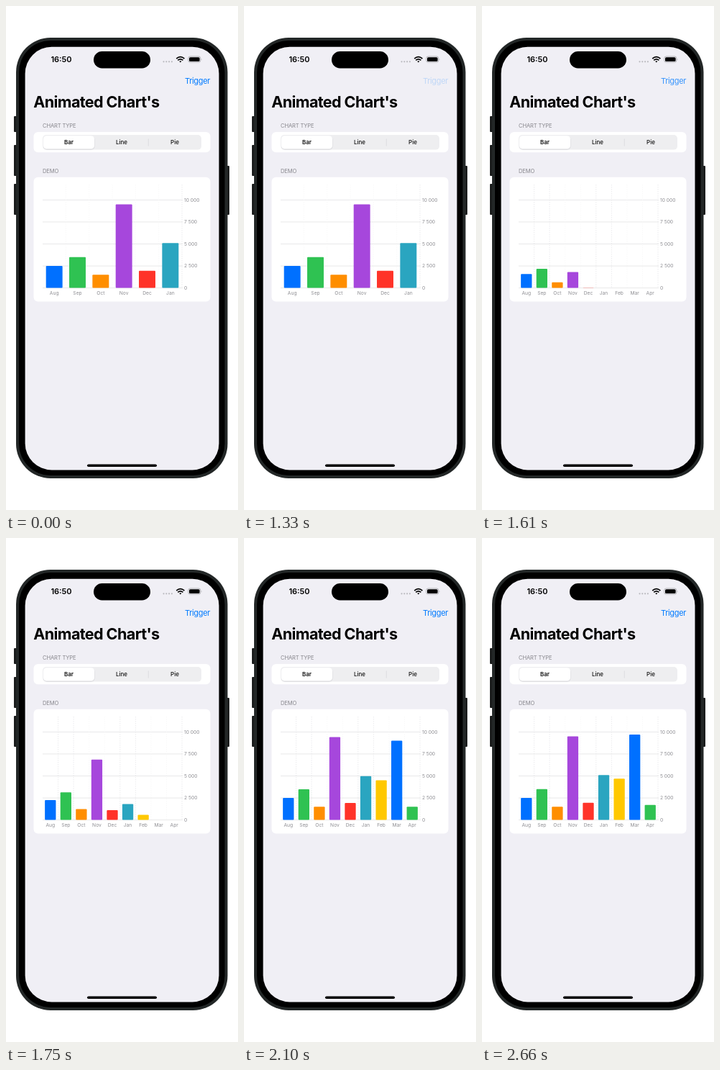
Recreate the animation shown at these times as an HTML page. Size 323x700 px, loop 2700 ms.

```html
<!DOCTYPE html>
<html lang="en">
<head>
<meta charset="utf-8">
<title>Animated chart</title>
<style>
  html, body { margin: 0; width: 100%; height: 100%; overflow: hidden; background: #fff; }
  svg { display: block; width: 323px; height: 700px; font-family: Inter, sans-serif; }
  .small { font-size: 6.7px; fill: #8e8e93; }
  .head { font-size: 7.6px; fill: #87868c; letter-spacing: -.15px; }
  .tab { font-size: 8px; text-anchor: middle; fill: #111; }
</style>
</head>
<body>
<svg viewBox="0 0 323 700">
  <!-- phone body -->
  <g fill="#1b1d1d">
    <rect x="11" y="153" width="6" height="22" rx="1"/>
    <rect x="11" y="193" width="6" height="43" rx="1"/>
    <rect x="11" y="247" width="6" height="43" rx="1"/>
    <rect x="305" y="222" width="6" height="68" rx="1"/>
  </g>
  <rect x="14" y="44" width="294.5" height="612" rx="48" fill="#232727"/>
  <rect x="18" y="48" width="286.5" height="604" rx="44"/>
  <rect x="26.6" y="56.8" width="269.9" height="587.6" rx="37" fill="#f0eff5"/>
  <rect x="122" y="63" width="79" height="23.5" rx="11.7"/>
  <rect x="113" y="636.4" width="97" height="3.6" rx="1.8"/>

  <!-- status bar -->
  <text x="77" y="78.3" font-size="11" font-weight="600" text-anchor="middle">16:50</text>
  <g fill="#b9b9be">
    <circle cx="219.5" cy="77.3" r="1.1"/><circle cx="223.3" cy="77.3" r="1.1"/>
    <circle cx="227.1" cy="77.3" r="1.1"/><circle cx="230.9" cy="77.3" r="1.1"/>
  </g>
  <g fill="none" stroke="#000" stroke-width="1.7">
    <path d="M237.2 73.2q5.6-5.2 11.2 0M239.2 75.4q3.6-3.2 7.2 0"/>
    <path d="M241.2 76.8q1.6-1.2 3.2 0l-1.6 1.6z" fill="#000" stroke="none"/>
  </g>
  <rect x="253.8" y="70" width="17" height="8.2" rx="2.6" fill="none" stroke="#a4a4a8" stroke-width=".8"/>
  <rect x="255" y="71.2" width="14.6" height="5.8" rx="1.6"/>
  <path d="M271.8 72.7q1.3 1.4 0 2.8z" fill="#a4a4a8"/>

  <!-- page -->
  <text id="trigger" x="284" y="107.8" font-size="11" letter-spacing="-.35" text-anchor="end" fill="#007aff">Trigger</text>
  <text x="38.3" y="140.8" font-size="21.6" font-weight="700" letter-spacing="-.63">Animated Chart's</text>
  <text class="head" x="51" y="169.3">CHART TYPE</text>
  <rect x="38.5" y="175" width="246" height="28.3" rx="6" fill="#fff"/>
  <rect x="51" y="179" width="221" height="20.6" rx="5" fill="#eeeef0"/>
  <rect x="52" y="181" width="71.5" height="18.7" rx="5" fill="#d9d9dd"/>
  <rect x="52" y="180.2" width="71" height="18.4" rx="4.6" fill="#fff"/>
  <path d="M198.3 184.5v10" stroke="#d8d8dc" stroke-width=".8"/>
  <text class="tab" x="87.5" y="192.2" font-weight="600">Bar</text>
  <text class="tab" x="161" y="192.2" font-weight="500">Line</text>
  <text class="tab" x="235" y="192.2" font-weight="500">Pie</text>
  <text class="head" x="51" y="232.4">DEMO</text>
  <rect x="38.5" y="237.7" width="246" height="172.8" rx="6" fill="#fff"/>
  <g id="chart"></g>
</svg>
<script>
const LOOP = 2700, STEP = 70, PRESS = 1260, RESET = 1430;
const LEFT = 51, RIGHT = 245, TOP = 248, BASE = 391.6, UNIT = 122.2 / 10000;
const blue = '#0070ff', green = '#2fc252';
const data = [
  ['Aug', 2500, blue], ['Sep', 3500, green], ['Oct', 1500, '#ff8e00'],
  ['Nov', 9500, '#a647dc'], ['Dec', 1950, '#ff3329'], ['Jan', 5100, '#2aa5c0'],
  ['Feb', 4700, '#ffc800'], ['Mar', 9700, blue], ['Apr', 1700, green]
];
const chart = document.getElementById('chart');
const trigger = document.getElementById('trigger');

// critically damped spring, time in ms
const spring = ms => {
  const u = Math.max(0, ms) * .0125;
  return 1 - (1 + u) * Math.exp(-u);
};
const startOf = i => i ? 1442 + 52 * (i - 1) : 1438;

const line = (d, color, dash = '') =>
  `<path d="${d}" stroke="${color}" stroke-width=".7" stroke-dasharray="${dash}"/>`;

function axes(count, band) {
  let out = '';
  for (let v = 0; v <= 10000; v += 2500) {
    const y = BASE - v * UNIT;
    const label = v < 1000 ? v : Math.floor(v / 1000) + ' ' + String(v % 1000).padStart(3, '0');
    out += line(`M${LEFT} ${y}H${RIGHT + 1}`, '#dedee0') +
      `<text class="small" x="248" y="${y + 2.4}">${label}</text>`;
  }
  for (let i = 1; i <= count; i++) {
    const strong = i == count || count > 6 && [1, 2, 5, 6].includes(i);
    out += line(`M${LEFT + i * band} ${TOP}V${BASE}`, strong ? '#e2e2e5' : '#f6f6f7', '1.5 1.5');
  }
  return out;
}

function bars(count, band, time) {
  const width = band * .71;
  return data.slice(0, count).map(([month, value, color], i) => {
    const x = LEFT + (i + .5) * band;
    const h = value * UNIT * (count > 6 ? spring(time - startOf(i)) : 1);
    return `<rect x="${x - width / 2}" y="${BASE - h}" width="${width}" height="${h}" rx="1" fill="${color}"/>` +
      `<text class="small" x="${x}" y="400.8" text-anchor="middle">${month}</text>`;
  }).join('');
}

function draw(now) {
  const time = Math.floor(now % LOOP / STEP) * STEP;
  const count = time < RESET ? 6 : 9;
  const band = (RIGHT - LEFT) / count;
  chart.innerHTML = axes(count, band) + bars(count, band, time);
  const release = Math.min(1, Math.max(0, (time - RESET) / 250));
  trigger.setAttribute('opacity', time < PRESS ? 1 : .2 + .8 * release);
  requestAnimationFrame(draw);
}
draw(performance.now());
</script>
</body>
</html>
```
